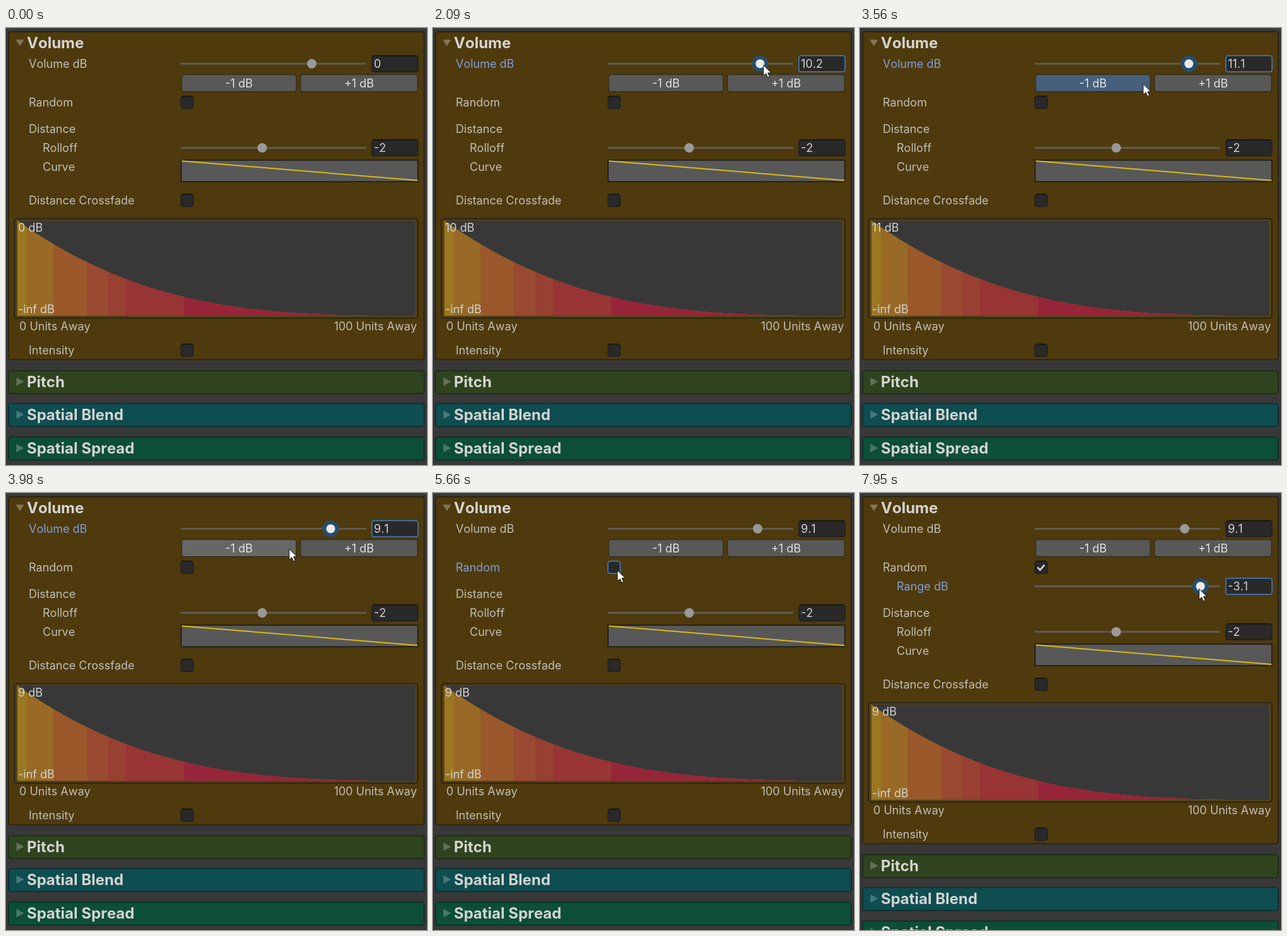
Animation, 666 px wide and 691 px high, one loop 8 s. Source, as an HTML page:

```html
<!DOCTYPE html>
<html lang="en">
<head>
<meta charset="utf-8">
<title>Volume settings</title>
<style>
  html, body { margin: 0; width: 100%; height: 100%; overflow: hidden; background: #383838; }
  svg { display: block; width: 666px; height: 691px; }
  text { font: 400 18px Inter, "Open Sans", sans-serif; font-kerning: none; fill: #c2bfb8; white-space: pre; }
  .title { font-size: 24px; font-weight: 700; fill: #d4d4d2; }
  .value, .graph { fill: #d2d2d2; }
  .caption { fill: #e2e2e2; text-anchor: middle; }
  .end { text-anchor: end; }
  .focus { fill: #7f9fd8; }
</style>
</head>
<body>
<svg id="stage" viewBox="0 0 666 691"></svg>
<script>
const LOOP = 8000;
const SHIFT = 30;
const stage = document.getElementById('stage');

function el(parent, tag, attrs, text) {
  const node = document.createElementNS('http://www.w3.org/2000/svg', tag);
  set(node, attrs);
  if (text !== undefined) node.textContent = text;
  parent.appendChild(node);
  return node;
}

function set(node, attrs) {
  for (const key in attrs) node.setAttribute(key, attrs[key]);
}

const box = (parent, x, y, width, height, fill, more) =>
  el(parent, 'rect', { x, y, width, height, fill, ...more });

const label = (parent, x, mid, text, cls = '') =>
  el(parent, 'text', { x, y: mid + 6, class: cls }, text);

// ---- controls ----

function inset(parent, x, y, w, h) {
  const rect = box(parent, x + .75, y + .75, w - 1.5, h - 1.5, '#292929',
    { rx: 3.5, stroke: '#1f1f1f', 'stroke-width': 1.5 });
  const shade = box(parent, x + 3, y, w - 6, 1.5, '#111');
  return focused => {
    set(rect, { stroke: focused ? '#4580c4' : '#1f1f1f' });
    set(shade, { opacity: focused ? 0 : 1 });
  };
}

function slider(parent, name, labelX, y) {
  const caption = label(parent, labelX, y, name);
  box(parent, 276, y - 2, 294, 3, '#5e5b55', { rx: 1 });
  const halo = el(parent, 'circle', { cy: y - .5, r: 13, fill: '#264e6e' });
  const thumb = el(parent, 'circle', { cy: y - .5, r: 7.5 });
  const frame = inset(parent, 578, y - 14, 74.5, 27);
  const value = label(parent, 582, y, '', 'value');
  return (x, text, focused, hover) => {
    set(caption, { class: focused ? 'focus' : '' });
    set(halo, { cx: x, opacity: focused ? 1 : 0 });
    set(thumb, { cx: x, r: focused ? 7 : 7.5, fill: focused || hover ? '#eaeaea' : '#999' });
    frame(focused);
    value.textContent = text;
  };
}

function checkbox(parent, name, y) {
  const caption = label(parent, 36, y, name);
  const frame = inset(parent, 276, y - 11, 21, 21);
  const tick = el(parent, 'path', {
    d: `M281 ${y - .5} l3.8 4.2 l7 -8`, fill: 'none', stroke: '#eee', 'stroke-width': 2.4, opacity: 0
  });
  return (checked, focused) => {
    set(caption, { class: focused ? 'focus' : '' });
    frame(focused);
    set(tick, { opacity: checked ? 1 : 0 });
  };
}

function button(parent, x, w, text) {
  box(parent, x - .5, 73.3, w + 1, 28, '#2a2718', { rx: 4 });
  const face = box(parent, x + .5, 74.3, w - 1, 25.7, '#585858', { rx: 3 });
  label(parent, x + w / 2, 88, text, 'caption');
  return fill => set(face, { fill });
}

function header(parent, y, text, fill, edge) {
  box(parent, 4, y, 657.5, 36.5, fill, { rx: 4, stroke: edge, 'stroke-width': 1.6 });
  el(parent, 'path', { d: `M16.5 ${y + 11} v13 l12 -6.5 z`, fill: '#fff', opacity: .25 });
  el(parent, 'text', { x: 33, y: y + 26, class: 'title' }, text);
}

function falloff(parent) {
  box(parent, 13.5, 301.7, 638, 157, '#fff', {
    rx: 4, 'fill-opacity': .04, stroke: '#242015', 'stroke-width': 1.8
  });
  box(parent, 18, 304.5, 629, 150.5, '#383838');
  const clip = el(parent, 'clipPath', { id: 'curve' });
  // This cubic is exactly (1 - u)^3.
  el(clip, 'path', { d: 'M18 304.5 C227.7 455 437.3 455 647 455 H18 Z' });
  const bands = el(parent, 'g', { 'clip-path': 'url(#curve)' });
  // Each band covers the rest of the one before it.
  const colors = { 18: '#9b7721', 33: '#986a26', 75: '#9a582b', 128: '#994a30',
    162: '#984032', 190: '#983434', 282: '#97253a' };
  for (const x in colors) box(bands, x, 304, 647 - x, 151, colors[x]);
  label(parent, 19, 445, '-inf dB', 'graph');
  label(parent, 21, 472, '0 Units Away');
  label(parent, 650, 472, '100 Units Away', 'end');
  return label(parent, 19, 316, '', 'graph');
}

// ---- layout ----

box(stage, 0, 0, 666, 1, '#484848');
box(stage, 0, 0, 1, 691, '#2c2c2c');
const panel = box(stage, 4, 6, 657.5, 518.5, '', { rx: 4, stroke: '#291f08', 'stroke-width': 1.6 });
el(stage, 'path', { d: 'M15.5 18.5 h13 l-6.5 10 z', fill: '#fff', opacity: .3 });
el(stage, 'text', { x: 33, y: 32, class: 'title' }, 'Volume');

const volume = slider(stage, 'Volume dB', 36, 57);
const minus = button(stage, 278, 181, '-1 dB');
button(stage, 466, 185, '+1 dB');
const random = checkbox(stage, 'Random', 118);
const rangeRow = el(stage, 'g', {});
const range = slider(rangeRow, 'Range dB', 58, 148);

const lower = el(stage, 'g', {});
label(lower, 36, 160, 'Distance');
slider(lower, 'Rolloff', 58, 190)(405.3, '-2', false, false);
label(lower, 58, 220, 'Curve');
box(lower, 277, 209, 374.5, 34, '#585858', { stroke: '#1c1a16', 'stroke-width': 1.6 });
el(lower, 'path', { d: 'M278 210.2 L651 241', stroke: '#d8b91a', 'stroke-width': 2 });
checkbox(lower, 'Distance Crossfade', 273)(false, false);
const peak = falloff(lower);
checkbox(lower, 'Intensity', 510)(false, false);
header(lower, 541.8, 'Pitch', '#2f441e', '#1a2712');
header(lower, 593.8, 'Spatial Blend', '#0e4d50', '#0a2b2d');
header(lower, 646.8, 'Spatial Spread', '#0d4e39', '#092c20');

const cursor = el(stage, 'path', {
  d: 'M0 0 V17 L4 13.3 L6.8 19.4 L9.6 18.2 L6.9 12.2 H12.2 Z',
  fill: '#fff', stroke: '#16130c', 'stroke-width': 1, 'stroke-linejoin': 'round'
});

// ---- motion ----

const ENTRY = [119, 499];
const drag = { start: 1710, end: 2440, steps: 14, to: [530, 59] };
const moves = [
  { start: 930, end: 1530, steps: 11, to: [483, 57], via: [380, 150] },
  drag,
  { start: 2810, end: 3560, steps: 13, to: [448, 88.5] },
  { start: 4350, end: 4860, steps: 9, to: [205, 237] },
  { start: 5040, end: 5720, steps: 12, to: [292.5, 121.5] },
  { start: 6270, end: 7070, steps: 15, to: [419, 176], via: [279, 204], power: 1 },
  { start: 7130, end: 7430, steps: 5, to: [537.5, 151.5], power: 1 },
  { start: 7770, end: 7950, steps: 3, to: [536.5, 151.5] }
];
const presses = [[3330, 3440], [3560, 3680], [3860, 3980]];

// Eased progress from 0 to 1, held between the screen updates.
function progress({ start, end, steps, power = 2.7 }, t) {
  const p = Math.min(1, Math.max(0, (t - start) / (end - start)));
  return 1 - (1 - Math.floor(p * steps) / steps) ** power;
}

function pointer(t) {
  let from = ENTRY;
  for (const move of moves) {
    if (t < move.start) break;
    const s = progress(move, t), a = from;
    from = move.to.map((b, i) => {
      const c = move.via ? move.via[i] : (a[i] + b) / 2;
      return (1 - s) ** 2 * a[i] + 2 * s * (1 - s) * c + s * s * b;
    });
  }
  return from;
}

const short = v => String(+v.toFixed(1));
const near = (v, mid, reach) => Math.abs(v - mid) < reach;

function draw(t) {
  const [x, y] = pointer(t);
  const shown = t >= 930, checked = t >= 5720;
  const db = 12.1 * progress(drag, t) - presses.filter(p => t >= p[1]).length;
  const rangeDb = t >= 7950 ? -3.1 : -3;
  const dbX = 483.7 + 3.29 * db, rangeX = 569.5 + 10 * rangeDb;

  const onSlider = shown && near(y, 57, 14), onRange = checked && near(y, 148, 14);
  const onMinus = near(x, 368, 91) && near(y, 88, 14);
  const onCheck = near(x, 286, 11) && near(y, 118, 11);
  const onControl = x > 276 && (y < 102 || onRange) || onCheck;
  const pressed = presses.some(([a, b]) => t >= a && t < b);

  set(panel, {
    fill: shown && !onControl ? '#5c450f' : '#4e3a0d',
    height: 518.5 + (checked ? SHIFT : 0)
  });
  volume(dbX, short(db), t >= drag.start && t < 5545, onSlider && near(x, dbX, 8));
  minus(pressed ? '#46607c' : onMinus ? '#676767' : '#585858');
  random(checked, t >= 5545 && t < 7770);
  range(rangeX, short(rangeDb), t >= 7770, onRange && near(x, rangeX, 8));
  set(rangeRow, { visibility: checked ? 'visible' : 'hidden' });
  set(lower, { transform: `translate(0 ${checked ? SHIFT : 0})` });
  peak.textContent = Math.round(db) + ' dB';
  set(cursor, {
    transform: `translate(${x.toFixed(1)} ${y.toFixed(1)})`,
    visibility: shown ? 'visible' : 'hidden'
  });
}

const start = performance.now();
function frame() {
  draw((performance.now() - start) % LOOP);
  requestAnimationFrame(frame);
}
frame();
</script>
</body>
</html>
```
